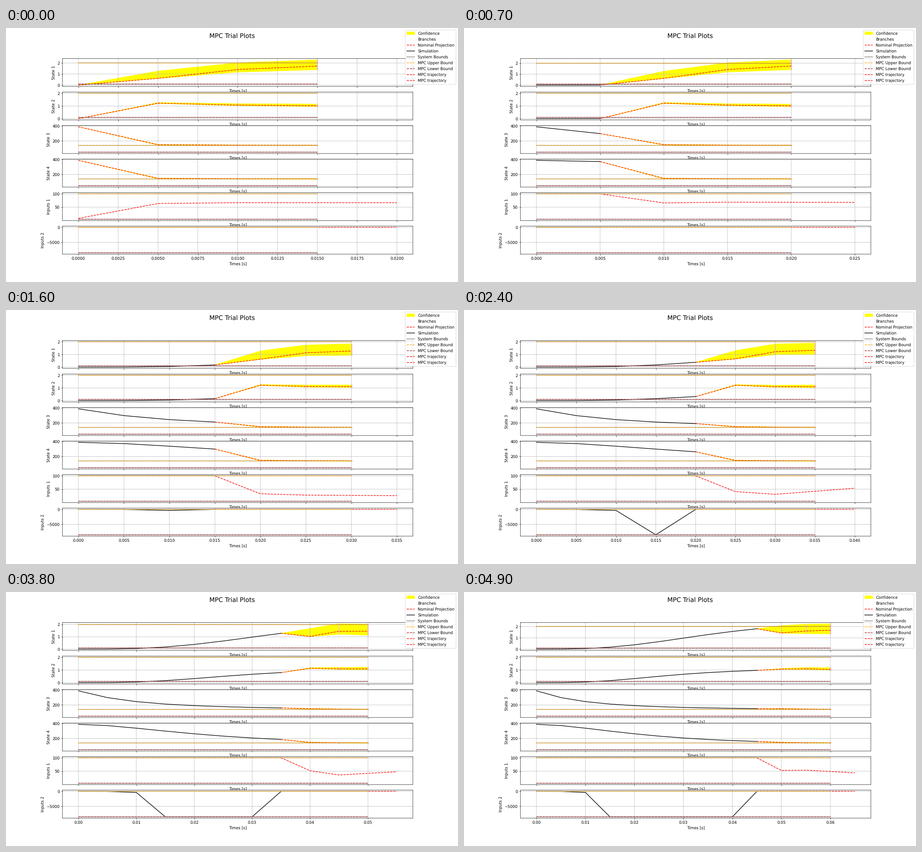
These frames come from a looping animation (998x561 px, 5 s). A matplotlib script:

```python
import numpy as np
import matplotlib.pyplot as plt
from matplotlib.animation import FuncAnimation

DPI = 62.375
DT = 0.005
HORIZON = 3
FRAMES_PER_STEP = 5
STEPS = 10

# Soft, unsnapped strokes and unhinted glyphs
plt.rcParams.update({"font.family": "DejaVu Sans", "path.snap": False,
                     "text.hinting": "no_hinting"})

NAMES = ["State 1", "State 2", "State 3", "State 4", "Inputs 1", "Inputs 2"]
BOUNDS = [(0.1, 2), (0.1, 2), (50, 140), (50, 140), (5, 100), (-8500, 0)]

# Key points of the first planned inputs, by control step
PLAN_STEPS = (0, 1, 3, 4, 6, 7, 9)
PLAN_FIRST = (64, 66, 33, 41, 63, 52, 53)
PLAN_SECOND = (67, 69, 28, 31, 58, 36, 54)
PLAN_LAST = (67, 68, 26, 54, 51, 48, 44)


def growth(n, ceiling, delay):
    return ceiling * n**3 / (n**3 + delay)


def simulate(i, n):
    """Simulated value of panel i at control steps n."""
    n = np.asarray(n, float)
    if i == 0:
        return growth(n, 2.8, 405)
    if i == 1:
        return growth(n, 1.2, 175)
    if i == 2:
        return 130 + 258 / (1 + 0.45 * n + 0.09 * n**2)
    if i == 3:
        return 130 + 258 * (1 + 0.41 * n) * np.exp(-0.41 * n)
    if i == 4:
        return np.full_like(n, 100)
    return np.maximum(-8500, -350 * 25 ** (n - 2))


def plan_input(i, step):
    if i == 5:
        return np.zeros(HORIZON + 2)
    first, second, last = (np.interp(step, PLAN_STEPS, values)
                           for values in (PLAN_FIRST, PLAN_SECOND, PLAN_LAST))
    start = 8.3 if step == 0 else 100
    return np.array([start, first, second, (second + last) / 2, last])


def predict_state(i, step):
    """Nominal, lower and upper prediction, starting at the current state."""
    x = float(simulate(i, step))
    u1, u2 = plan_input(4, step)[1:3]
    j = np.arange(HORIZON)
    if i == 0:
        ahead = [0.62 + 0.25 * x**2]
        for u in (u1, u2):
            ahead.append(0.61 + 0.009 * u + 0.36 * ahead[-1])
        up, down = 0.65 - 0.04 * j, 0.02 + 0.22 * np.sqrt(j)
    elif i == 1:
        ahead = [1.22 - 0.17 * x**3, 1.175 - 0.0016 * u1, 1.175 - 0.0024 * u2]
        up, down = 0.05 + 0.06 * np.sqrt(j), 0.02 + 0.035 * np.sqrt(j)
    else:
        ahead = 140 + (10 if i == 2 else 7.5) * 0.45**j
        up, down = 3, 5
    ahead = np.array(ahead)
    return [np.r_[x, part] for part in (ahead, ahead - down, ahead + up)]


fig, axes = plt.subplots(6, 1, sharex=True, dpi=DPI,
                         figsize=(998 / DPI + 1e-6, 561 / DPI + 1e-6))
fig.suptitle("MPC Trial Plots", fontsize=16)


class Panel:
    def __init__(self, index, ax):
        self.index, self.ax = index, ax
        self.is_state = index < 4
        first = index == 0

        def line(label, shown=first, **style):
            return ax.plot([], [], label=label if shown else "_", **style)[0]

        if self.is_state:
            self.band = ax.fill([0], [0], color="yellow", linewidth=1,
                                label="Confidence" if first else "_")[0]
            self.branches = ax.scatter([], [], s=1, color="pink", linewidths=1,
                                       label="Branches" if first else "_")
            self.plan = line("Nominal Projection", color="red", ls="--")
        else:
            self.plan = line("MPC trajectory", True, color="red", ls="--")
        self.sim = line("Simulation", color="black")
        self.limits = [line("System Bounds", color="gray"), line("_", color="gray")]
        self.high = line("MPC Upper Bound", color="orange", ls="--")
        self.low = line("MPC Lower Bound", color="brown", ls="--")
        ax.set_ylabel(NAMES[index])
        ax.set_xlabel("Times [s]")
        ax.grid(True)

    def update(self, step):
        i = self.index
        low, high = BOUNDS[i]
        values = [low, high]
        if self.is_state:
            plan, bottom, top = predict_state(i, step)
            t = DT * (step + np.arange(HORIZON + 1))
            self.band.set_xy(np.column_stack((np.r_[t, t[::-1]],
                                              np.r_[top, bottom[::-1]])))
            self.branches.set_offsets(np.vstack([
                np.column_stack((np.full(3 ** (j + 1), t[j]),
                                 np.linspace(bottom[j], top[j], 3 ** (j + 1))))
                for j in range(1, HORIZON + 1)]))
            values += [*bottom, *top]
        else:
            plan = plan_input(i, step)
            t = DT * (step + np.arange(HORIZON + 2))
        self.plan.set_data(t, plan)

        past = np.r_[simulate(i, np.arange(step)), plan[0]]
        self.sim.set_data(DT * np.arange(step + 1), past)

        span = [0, DT * (step + HORIZON)]
        for artist, level in zip(self.limits + [self.high, self.low],
                                 (high, low, high, low)):
            artist.set_data(span, [level, level])

        values += [*plan, *past]
        margin = 0.05 * (max(values) - min(values))
        self.ax.set_ylim(min(values) - margin, max(values) + margin)


panels = [Panel(i, ax) for i, ax in enumerate(axes)]
fig.legend()


def draw(frame):
    step = frame // FRAMES_PER_STEP
    for panel in panels:
        panel.update(step)
    end = DT * (step + HORIZON + 1)
    axes[0].set_xlim(-0.05 * end, 1.05 * end)
    return []


animation = FuncAnimation(fig, draw, frames=STEPS * FRAMES_PER_STEP, interval=100,
                          init_func=lambda: draw(0), repeat=True, repeat_delay=0)
plt.show()
```
